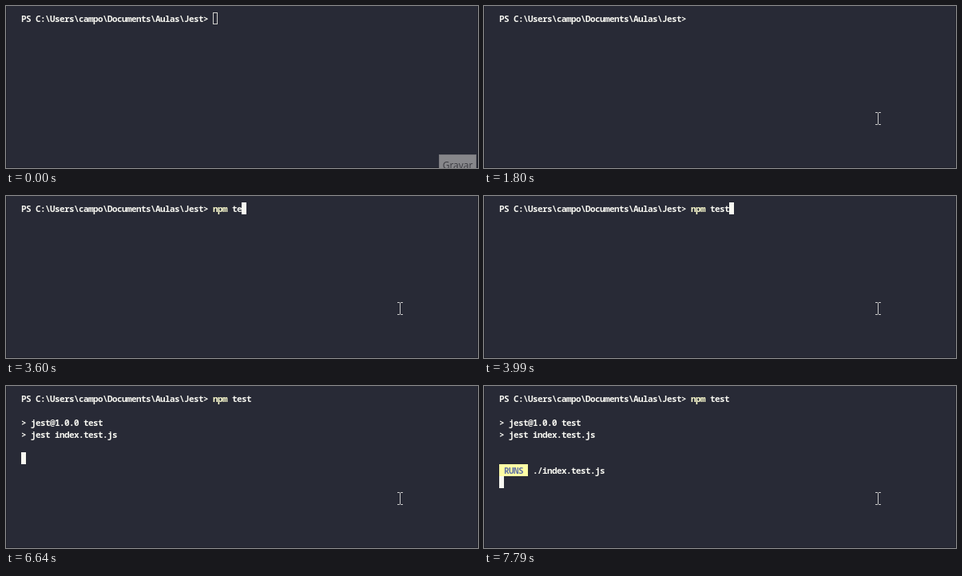
An HTML page that plays this animation: 591x203 px, repeating every 8 s.

```html
<!DOCTYPE html>
<html lang="pt">
<head>
<meta charset="utf-8">
<title>Terminal</title>
<style>
  html, body { margin: 0; width: 100%; height: 100%; overflow: hidden; background: #282a36; }
  #stage { position: relative; width: 591px; height: 203px; overflow: hidden; background: #282a36; }
  #edge { position: absolute; inset: 0; border: solid #1f2029; border-width: 0 1px 1px; }
  #stage > * { box-sizing: border-box; }
  .row { position: absolute; left: 19px; height: 15px; white-space: pre; color: #f8f8f2;
    font: 600 11px/15px "Noto Sans Mono", "DejaVu Sans Mono", monospace;
    letter-spacing: -0.6px; font-variant-ligatures: none; }
  .cmd { color: #ffffd2; }
  .dim { color: #90918f; }
  .file { font-weight: 700; }
  .badge { width: 36px; background: #ffffa5; color: #6272a4; }
  #caret { position: absolute; width: 6px; height: 15px; border: 1px solid #f8f8f2; }
  #caret.hollow { border-color: #d0d0cc; }
  #caret.block { background: #f8f8f2; }
  #pointer { position: absolute; left: 490px; top: 133px; }
  #button { position: absolute; left: 542px; top: 186px; width: 47px; height: 24px; background: #87878b;
    border: 1px solid #77777c; color: #3a3a40; text-align: center;
    font: 12px/26px "Open Sans", "Noto Sans", sans-serif; }
</style>
</head>
<body>
<div id="stage">
  <div id="edge"></div>
  <div id="rows"></div>
  <div id="caret"></div>
  <div id="button">Gravar</div>
  <svg id="pointer" width="7" height="16" shape-rendering="crispEdges" fill="none" stroke="#cacaca">
    <path d="M0 .5H3M4 .5H7M3.5 1V15M0 15.5H3M4 15.5H7"/>
  </svg>
</div>
<script>
const LOOP = 8000, CELL = 6, LINE = 15, LEFT = 19, TOP = 8;
const PROMPT = 'PS C:\\Users\\campo\\Documents\\Aulas\\Jest> ';
const COMMAND = 'npm test';
const $ = id => document.getElementById(id);

// [time, typed characters, caret style]
const typing = [
  [0, 0, 'hollow'], [1130, 0, 'block'], [1800, 0, 'off'], [1860, 1, 'block'],
  [2190, 2, 'block'], [2520, 3, 'block'], [2850, 4, 'block'], [3470, 4, 'off'],
  [3535, 5, 'block'], [3600, 6, 'block'], [3800, 7, 'block'], [3895, 8, 'block']
];
// [time, caret column, caret row] once the command has been sent
const running = [[5320, 0, 1], [6640, 0, 5], [7720, 33, 5], [7790, 0, 7]];
// [start, end, row, class, text, column]
const output = [
  [6640, LOOP, 2, '', '> jest@1.0.0 test', 0],
  [6640, LOOP, 3, '', '> jest index.test.js', 0],
  [7720, 7790, 5, 'dim', 'Determining test suites to run...', 0],
  [7790, LOOP, 6, 'badge', ' RUNS ', 0],
  [7790, LOOP, 6, 'file', './index.test.js', 7]
];
// [time, x offset, y offset]
const pointerPath = [[460, 18, 42], [530, 5, 12], [600, 0, 0]];
const buttonFade = [[0, 1], [70, 0.45], [110, 0]];

const at = (steps, t) => steps.filter(s => s[0] <= t).pop();

function addText(row, col, cls, text) {
  const el = document.createElement('div');
  el.className = 'row ' + cls;
  el.style.left = LEFT + col * CELL + 'px';
  el.style.top = TOP + row * LINE + 'px';
  el.textContent = text;
  $('rows').append(el);
  return el;
}

addText(0, 0, '', PROMPT);
const program = addText(0, PROMPT.length, 'cmd', '');
const argument = addText(0, PROMPT.length + 4, '', '');
const lines = output.map(([start, end, row, cls, text, col]) =>
  ({ start, end, el: addText(row, col, cls, text) }));

function draw(t) {
  const [, typed, style] = at(typing, t);
  const run = at(running, t);
  const [col, row] = run ? run.slice(1) : [PROMPT.length + typed, 0];
  program.textContent = COMMAND.slice(0, Math.min(typed, 3));
  argument.textContent = COMMAND.slice(4, Math.max(typed, 4));

  const caret = $('caret');
  caret.className = style;
  caret.style.visibility = style === 'off' ? 'hidden' : 'visible';
  caret.style.left = LEFT + col * CELL + 'px';
  caret.style.top = TOP + row * LINE + 'px';

  for (const { start, end, el } of lines)
    el.style.visibility = t >= start && t < end ? 'visible' : 'hidden';

  const move = at(pointerPath, t);
  $('pointer').style.visibility = move ? 'visible' : 'hidden';
  if (move) $('pointer').style.transform = `translate(${move[1]}px, ${move[2]}px)`;
  $('button').style.opacity = at(buttonFade, t)[1];
}

const begin = performance.now();
function tick() {
  draw((performance.now() - begin) % LOOP);
  requestAnimationFrame(tick);
}
tick();
</script>
</body>
</html>
```
